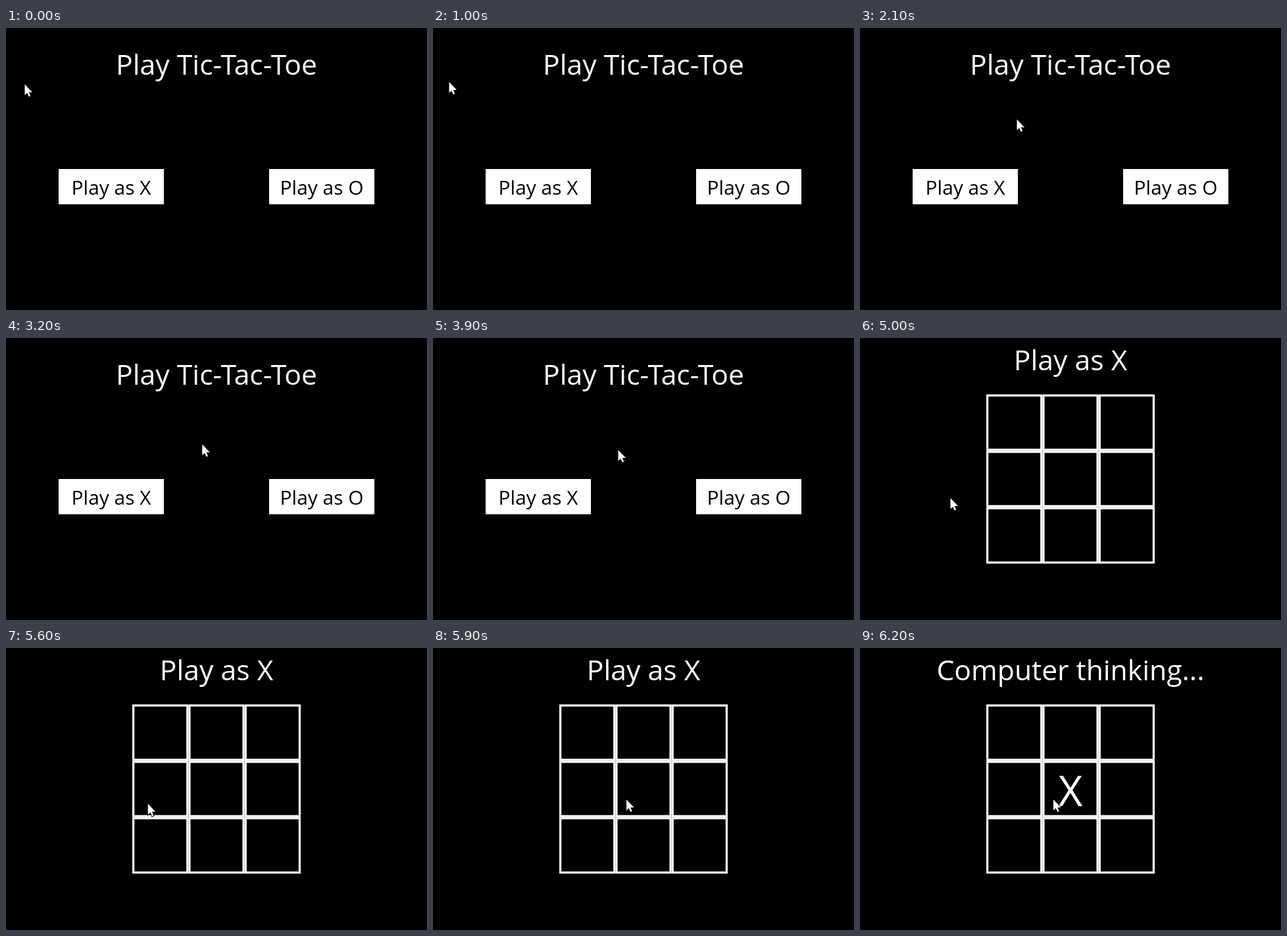
Animation, 640 px wide and 428 px high, one loop 8 s. Source, as an HTML page:

```html
<!DOCTYPE html>
<html lang="en">
<head>
<meta charset="utf-8">
<title>Tic-Tac-Toe</title>
<style>
  html, body { margin: 0; width: 100%; height: 100%; overflow: hidden; background: #000; }
  svg { display: block; width: 100%; height: 100%; }
  text { font: 40px "Open Sans", "Noto Sans", sans-serif; fill: #fff; text-anchor: middle; }
  .label { font-size: 28px; fill: #000; }
  .move { font-size: 60px; }
  #board rect { fill: none; stroke: #fff; stroke-width: 3; }
  #cursor { fill: #fff; stroke: #000; stroke-width: 2; paint-order: stroke; }
</style>
</head>
<body>
<svg viewBox="0 0 640 428">
  <!-- The game window is 600 x 400, shown scaled up to the stage. -->
  <g transform="scale(1.066667 1.07)">
    <g id="menu">
      <text x="300" y="66">Play Tic-Tac-Toe</text>
      <rect x="75" y="200" width="150" height="50" fill="#fff"/>
      <text class="label" x="150" y="236">Play as X</text>
      <rect x="375" y="200" width="150" height="50" fill="#fff"/>
      <text class="label" x="450" y="236">Play as O</text>
    </g>
    <g id="game">
      <text id="status" x="300" y="46"></text>
      <g id="board"></g>
      <text id="move" class="move" x="300" y="224">X</text>
    </g>
  </g>
  <path id="cursor" d="M0 0V16.5L3.7 13L6.2 18.7L8.7 17.7L6.3 12H11.5Z"/>
</svg>
<script>
const LOOP = 8000, STEP = 100;
const GAME_START = 5000, MOVE_MADE = 6200;
const HIDDEN_FROM = 1100, HIDDEN_UNTIL = 2100;

// Each glide starts at `at` and reaches (x, y) in `steps` ticks.
const glides = [
  { at: 0, steps: 1, x: 28.5, y: 85.5 },
  { at: 1000, steps: 1, x: 24.5, y: 82 },
  { at: 2100, steps: 1, x: 238.5, y: 138.7 },
  { at: 2200, steps: 1, x: 239.5, y: 142 },
  { at: 2500, steps: 3, x: 384.5, y: 120 },
  { at: 3200, steps: 1, x: 298.3, y: 161.5 },
  { at: 3900, steps: 5, x: 137.5, y: 243 },
  { at: 5400, steps: 6, x: 294, y: 230 }
];

const byId = id => document.getElementById(id);
const [menu, game, status, board, move, cursor] =
  ["menu", "game", "status", "board", "move", "cursor"].map(byId);
const show = (element, visible) => element.style.display = visible ? "" : "none";
const smooth = p => p * p * (3 - 2 * p);

for (let i = 0; i < 9; i++) {
  const cell = document.createElementNS(board.namespaceURI, "rect");
  const box = { x: 181.5 + i % 3 * 80, y: 81.5 + Math.floor(i / 3) * 80, width: 77, height: 77 };
  for (const key in box) cell.setAttribute(key, box[key]);
  board.append(cell);
}

function cursorAt(time) {
  const index = glides.findLastIndex(glide => time >= glide.at);
  const to = glides[index], from = glides[Math.max(0, index - 1)];
  const tick = Math.floor((time - to.at) / STEP) + 1;
  const p = smooth(Math.min(1, tick / to.steps));
  return [from.x + (to.x - from.x) * p, from.y + (to.y - from.y) * p];
}

function draw() {
  const time = performance.now() % LOOP;
  show(menu, time < GAME_START);
  show(game, time >= GAME_START);
  show(move, time >= MOVE_MADE);
  show(cursor, time < HIDDEN_FROM || time >= HIDDEN_UNTIL);
  status.textContent = time < MOVE_MADE ? "Play as X" : "Computer thinking...";
  cursor.setAttribute("transform", `translate(${cursorAt(time)})`);
  requestAnimationFrame(draw);
}
draw();
</script>
</body>
</html>
```
